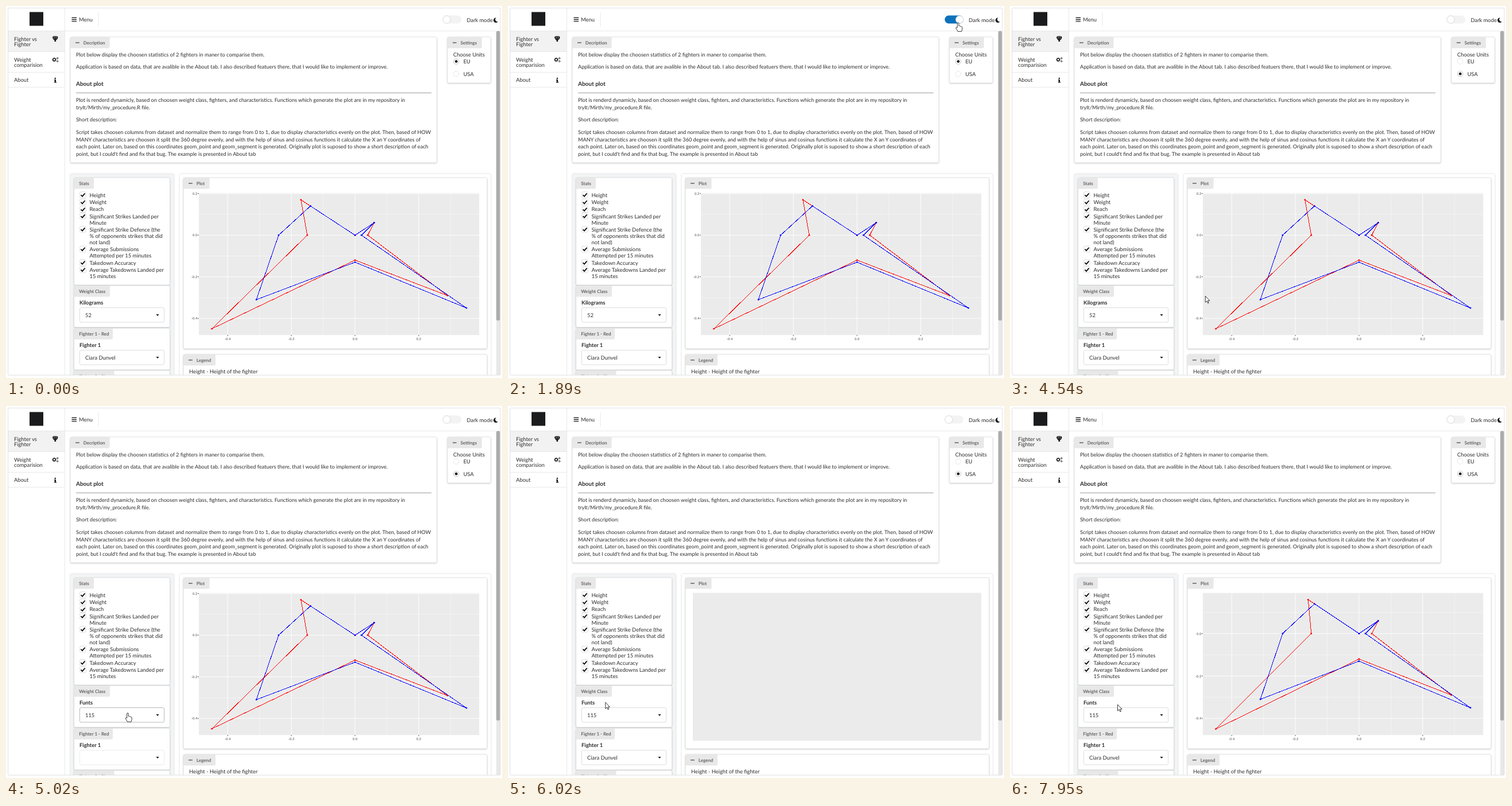
Animation, 864 px wide and 648 px high, one loop 8000 ms. Source, as an HTML page:

```html
<!DOCTYPE html>
<html lang="en">
<head>
<meta charset="utf-8">
<title>Fighter dashboard</title>
<style>
html, body { margin: 0; width: 100%; height: 100%; overflow: hidden; background: #fff; }
svg { display: block; width: 864px; height: 648px; }
text { font: 9.35px Lato, sans-serif; fill: #2c2c2c; text-rendering: geometricPrecision; white-space: pre; }
.about text { font-size: 9.14px; }
.b { font-weight: 700; }
.about .h { font-size: 10px; font-weight: 700; }
text.tab { font-size: 8px; font-weight: 700; fill: #666; }
.ax { font: 6px "Liberation Sans", Arial, sans-serif; fill: #4d4d4d; }
.card { fill: #fff; stroke: #d9dadb; stroke-width: .7; filter: drop-shadow(0 1px 1px rgba(34,36,38,.22)); }
.seg { filter: drop-shadow(0 0 1.2px rgba(34,36,38,.25)); }
.line { stroke: #e4e4e5; stroke-width: .8; fill: none; }
.box { fill: #fff; stroke: #d4d4d5; stroke-width: .8; }
.radio { fill: #fff; stroke: #e0e0e1; stroke-width: .8; }
.dot { fill: #1b1c1d; stroke: none; visibility: hidden; }
.on .radio { stroke: #b4b5b6; }
.on .dot { visibility: visible; }
.ink { fill: #1b1c1d; }
#trace { stroke-width: 1; shape-rendering: crispEdges; }
#trace circle { shape-rendering: auto; }
</style>
</head>
<body>
<svg viewBox="0 0 864 648">
  <defs><clipPath id="page"><rect x="3" y="3" width="858.5" height="640" rx="2"/></clipPath></defs>
  <g id="ui" clip-path="url(#page)"></g>
  <rect x="3.5" y="3.5" width="857.5" height="639.5" rx="2" fill="none" stroke="#dcdddd" stroke-width=".9"/>
  <path id="cursor" fill="#fff" stroke="#222" stroke-width=".9" stroke-linejoin="round"/>
</svg>
<script>
const $ = id => document.getElementById(id);
const text = (x, y, s, cls = '', more = '') => `<text x="${x}" y="${y}" class="${cls}" ${more}>${s}</text>`;
const rect = (x, y, w, h, more = '') => `<rect x="${x}" y="${y}" width="${w}" height="${h}" ${more}/>`;
const path = (d, more = '') => `<path d="${d}" ${more}/>`;
const lines = (x, y, step, list) => list.map((s, i) => text(x, y + i * step, s)).join('');

function card(x, y, w, h, title, tabW, fold) {
  const dash = fold ? rect(x + 9, y + 9.2, 6.8, 1.4, 'fill="#555"') : '';
  return rect(x, y, w, h, 'class="card" rx="2.5"') +
    path(`M${x} ${y + 19.5}v-17q0-2.5 2.5-2.5h${tabW - 2.5}v17q0 2.5-2.5 2.5z`, 'fill="#e8e8e8"') +
    dash + text(x + (fold ? 22.7 : 8.7), y + 13, title, 'tab');
}

const select = (y, id, value, boxId) =>
  rect(128.4, y, 147.2, 25.4, `id="${boxId}" class="box" rx="2.5"`) +
  text(138, y + 16, value, '', `id="${id}"`) +
  path(`M261.3 ${y + 11.5}h5.4l-2.7 3z`, 'class="ink"');

const check = y => rect(128.6, y - 5.3, 10.6, 10.6, 'class="box" rx="2"') +
  path(`M130.4 ${y + .1}l2.6 2.6l4.5-5.3`, 'fill="none" stroke="#111" stroke-width="1.9"');

const radio = (y, id) => `<g id="${id}"><circle cx="784.3" cy="${y}" r="4.8" class="radio"/>` +
  `<circle cx="784.3" cy="${y}" r="2.4" class="dot"/></g>`;

function gear(x, y, r) {
  return `<circle cx="${x}" cy="${y}" r="${r}" fill="none" stroke="#1b1c1d" stroke-width="${r * .7}"/>` +
    `<circle cx="${x}" cy="${y}" r="${r * 1.45}" fill="none" stroke="#1b1c1d" stroke-width="${r * .4}" stroke-dasharray="${r * .57}"/>`;
}

function header() {
  return rect(41, 10.5, 24, 24, 'class="ink"') +
    path('M3 43.5H861M102.5 3V643M161 11V36', 'class="line"') +
    path('M114.5 20.5h8.5m-8.5 3.2h8.5m-8.5 3.2h8.5', 'stroke="#222" stroke-width="1.4"') +
    text(127, 27, 'Menu') +
    rect(760.7, 16.6, 32.7, 14, 'id="track" rx="7"') +
    '<circle id="knob" cy="23.6" r="6.7" fill="#fff" stroke="#d0d0d1" stroke-width=".8"/>' +
    text(802.5, 27.6, 'Dark mode') +
    path('M853.8 20.4a4.3 4.3 0 1 0 3 6.9a3.9 3.9 0 0 1-3-6.9z', 'class="ink"');
}

function sidebar() {
  return rect(3, 44, 99, 35.5, 'fill="#f2f2f2"') +
    path('M3 79.5H102M3 115.5H102M3 141.5H102', 'class="line"') +
    lines(14, 61, 9.4, ['Fighter vs', 'Fighter']) +
    lines(14, 96.6, 9.4, ['Weight', 'comparision']) + text(14, 132.2, 'About') +
    path('M81 55q0-2.6 2.5-2.6h4.4q2.6 0 2.6 2.6q-.6 3-3.4 4.6v2.4h-2.7v-2.4q-2.8-1.6-3.4-4.6z', 'class="ink"') +
    path('M84 53v4m3.3-4v4', 'stroke="#f2f2f2" stroke-width=".6"') +
    gear(84, 93.5, 2.2) + gear(89.6, 91, 1.1) + gear(89.6, 96.3, 1.1) +
    path('M84.6 125h2.4v1.9h-2.4zM83.8 128h3.2v4h.9v1.4h-4.1v-1.4h.9v-2.6h-.9z', 'class="ink"');
}

function description() {
  return card(112, 54, 638.5, 219, 'Decription', 68.5, true) + '<g class="about">' +
    text(122, 87.5, 'Plot below display the choosen statistics of 2 fighters in maner to comparise them.') +
    text(122, 109.3, 'Application is based on data, that are avalible in the About tab. I also described featuers there, that I would like to implement or improve.') +
    text(122, 139, 'About plot', 'h') + path('M122 151.3H741', 'stroke="#808080" stroke-width=".8"') +
    lines(122, 166.8, 12.7, [
      'Plot is renderd dynamicly, based on choosen weight class, fighters, and characteristics. Functions which generate the plot are in my repository in',
      'tryIt/Mirth/my_procedure.R file.']) +
    text(122, 201.2, 'Short description:') +
    lines(122, 223, 12.7, [
      'Script takes choosen columns from dataset and normalize them to range from 0 to 1, due to display characteristics evenly on the plot. Then, based of HOW',
      'MANY characteristics are choosen it split the 360 degree evenly, and with the help of sinus and cosinus functions it calculate the X an Y coordinates of',
      'each point. Later on, based on this coordinates geom_point and geom_segment is generated. Originally plot is suposed to show a short description of each',
      "point, but I could't find and fix that bug. The example is presented in About tab"]) + '</g>';
}

function settings() {
  return card(769, 54, 75.5, 80, 'Settings', 60, true) + text(779, 87.5, 'Choose Units') +
    radio(96.6, 'eu') + text(796.7, 100.2, 'EU') + radio(118.2, 'usa') + text(796.7, 122, 'USA');
}

function controls() {
  return rect(112, 292.5, 180.5, 370, 'class="seg" rx="2.5" fill="#f3f4f5"') +
    card(118.5, 299, 167, 187, 'Stats', 34.5) +
    [329, 341.6, 354.2, 366, 389, 423.5, 447, 459.3].map(check).join('') +
    lines(145.5, 332.5, 12.4, ['Height', 'Weight', 'Reach', 'Significant Strikes Landed per']) +
    text(145.5, 381, 'Minute') +
    lines(145.5, 392.6, 11.4, ['Significant Strike Defence (the', '% of opponents strikes that did', 'not land)', 'Average Submissions']) +
    text(145.5, 438.3, 'Attempted per 15 minutes') + text(145.5, 451, 'Takedown Accuracy') +
    lines(145.5, 462.8, 11.4, ['Average Takedowns Landed per', '15 minutes']) +
    card(118.5, 487, 167, 72.5, 'Weight Class', 62.5) + text(128, 519.6, '', 'b', 'id="unit"') +
    select(525.5, 'weight', '', 'weightBox') +
    card(118.5, 561.3, 167, 72.5, 'Fighter 1 - Red', 67.5) + text(128, 593.8, 'Fighter 1', 'b') +
    select(599.6, 'name', 'Ciara Dunvel', 'nameBox') +
    card(118.5, 634.8, 167, 72, 'Fighter 2 - Blue', 70);
}

function charts() {
  return rect(302.5, 292.5, 542, 370, 'class="seg" rx="2.5" fill="#fff"') +
    card(309, 299, 529, 298, 'Plot', 45.5, true) + '<g id="plot"></g>' +
    card(309, 606.8, 529, 70, 'Legend', 56, true) + text(319, 640, 'Height - Height of the fighter');
}

$('ui').innerHTML = header() + rect(854, 44, 7, 599, 'fill="#e8e8e8"') +
  rect(854, 43.5, 6.6, 504.5, 'rx="3.3" fill="#acacac"') +
  sidebar() + description() + settings() + controls() + charts();

// Eight spokes, 45 degrees apart, starting at the lower left.
function polygon(radii) {
  const dirs = [[-1, -1], [-1, 0], [-1, 1], [0, 1], [1, 1], [1, 0], [1, -1], [0, -1]];
  return radii.map((r, i) => [dirs[i][0] * r, dirs[i][1] * r]);
}
const redKg = polygon([.45, .15, .17, 0, .06, .04, .29, .12]);
const redLb = polygon([.45, .15, .16, 0, .06, .04, .29, .12]);
const blue = polygon([.31, .24, .14, 0, .06, .02, .35, .13]);

function plot(x0, kx, y0, ky, shapes) {
  const X = v => x0 + v * kx, Y = v => y0 - v * ky;
  const f = n => n.toFixed(2);
  let grid = '', axes = '';
  for (let i = -5; i <= 3; i++) {
    const v = i / 10, x = X(v), y = Y(v), major = i % 2 === 0;
    const style = `stroke="#fff" stroke-width="${major ? .9 : .45}"`;
    if (x > 336 && x < 824) {
      grid += path(`M${f(x)} 326V573`, style);
      if (major) axes += path(`M${f(x)} 573v2`, 'stroke="#333" stroke-width=".8"') +
        text(f(x), 582.2, v.toFixed(1), 'ax', 'text-anchor="middle"');
    }
    if (y > 326 && y < 573) {
      grid += path(`M336 ${f(y)}H824`, style);
      if (major) axes += path(`M334 ${f(y)}h2`, 'stroke="#333" stroke-width=".8"') +
        text(333.3, f(y + 2.2), v.toFixed(1), 'ax', 'text-anchor="end"');
    }
  }
  const trace = shapes.map(([pts, color]) => {
    const p = pts.map(([x, y]) => [f(X(x)), f(Y(y))]);
    return `<polygon points="${p.join(' ')}" fill="none" stroke="${color}"/>` +
      p.map(([x, y]) => `<circle cx="${x}" cy="${y}" r="1.4" fill="${color}"/>`).join('');
  }).join('');
  return rect(336, 325.7, 488.3, 247.5, 'fill="#ebebeb"') + grid + axes + `<g id="trace">${trace}</g>`;
}

const plots = {
  kg: plot(608, 554.5, 399.2, 362.5, [[redKg, '#f00'], [blue, '#00f']]),
  lb: plot(608, 554.5, 396.4, 369.5, [[redLb, '#f00'], [blue, '#00f']]),
  empty: rect(322, 325.5, 502.3, 257.5, 'fill="#ebebeb"'),
  red: plot(628, 600, 396.4, 369.5, [[redLb, '#f00']])
};

const arrow = 'M0 0V11L2.6 8.7L4.4 12.6L6 11.9L4.3 8.1H7.6Z';
const hand = 'M-1.3 9V1.3Q-1.3 0 0 0T1.3 1.3V5.6Q3 5 3.5 6.2Q5 5.6 5.5 7Q7 6.6 7.2 8.3V11Q7 13 6 15.4H-.5Q-1.5 12.5-3.8 9.8Q-4 8-2.5 8.2Z';

// time, x, y of the pointer tip
const route = [
  [760, 862, 626], [950, 862, 283], [1100, 862, 535], [1300, 838, 230], [1500, 796, 50], [1640, 784, 29],
  [2070, 784, 29], [2180, 778, 27], [2420, 642, 149], [2620, 715, 0], [2850, 811, 22], [2990, 718, 66],
  [3130, 753, 102], [3260, 794, 118], [3420, 794, 118], [3490, 795, 118], [3660, 795, 118], [3730, 792.5, 118],
  [4270, 792.5, 118], [4400, 590, 300], [4540, 341, 505], [4710, 215, 534], [4910, 215, 534],
  [5200, 207, 536], [5360, 207, 536], [5560, 211, 536.5], [5750, 150, 558], [5880, 117, 548],
  [6020, 170, 516], [6170, 128, 548], [6260, 119, 560], [6420, 180.5, 520.5], [7890, 180.5, 520.5], [7950, 187.5, 520]
];

function pointer(t) {
  const i = route.findIndex(p => p[0] > t);
  if (i < 0) return route[route.length - 1].slice(1);
  const [t0, x0, y0] = route[i - 1], [t1, x1, y1] = route[i];
  const k = (t - t0) / (t1 - t0);
  return [x0 + (x1 - x0) * k, y0 + (y1 - y0) * k];
}

const ramp = (t, a, b) => { const k = Math.min(1, Math.max(0, (t - a) / (b - a))); return k * k * (3 - 2 * k); };
const within = (t, a, b) => t >= a && t < b;
const show = (id, on) => $(id).setAttribute('visibility', on ? 'visible' : 'hidden');
const mix = (a, b, k) => `rgb(${a.map((v, i) => Math.round(v + (b[i] - v) * k))})`;
let current = '';

function render(t) {
  const on = ramp(t, 1680, 1880) - ramp(t, 2080, 2280);
  $('knob').setAttribute('cx', 767.7 + 18.9 * on);
  const off = within(t, 1600, 4270) ? 222 : 243;
  $('track').setAttribute('fill', mix([off, off, off], [13, 113, 187], on));

  const usa = t >= 4270;
  $('eu').classList.toggle('on', !usa);
  $('usa').classList.toggle('on', usa);
  $('unit').textContent = t < 4690 ? 'Kilograms' : 'Funts';
  $('weight').textContent = t < 4690 ? '52' : '115';
  const noName = within(t, 4930, 5900);
  show('name', !noName);
  $('nameBox').style.stroke = noName ? '#e6e6e6' : '';
  $('weightBox').style.stroke = within(t, 4690, 5620) ? '#a8a8a9' : '';

  const key = t < 5080 ? 'kg' : t < 5840 ? 'lb' : t < 6140 ? 'empty' : t < 6860 ? 'red' : 'lb';
  if (key !== current) $('plot').innerHTML = plots[current = key];
  if (key === 'red') $('trace').setAttribute('opacity', 1 - .7 * ramp(t, 6170, 6420));

  const visible = t >= 760 && !within(t, 960, 1100);
  show('cursor', visible);
  if (visible) {
    const [x, y] = pointer(t);
    const link = within(t, 1580, 2200) || within(t, 3200, 4300) || within(t, 4670, 5640);
    $('cursor').setAttribute('d', link ? hand : arrow);
    $('cursor').setAttribute('transform', `translate(${x.toFixed(2)} ${y.toFixed(2)})`);
  }
}

const start = performance.now();
function tick() {
  render((performance.now() - start) % 8000);
  requestAnimationFrame(tick);
}
tick();
</script>
</body>
</html>
```
